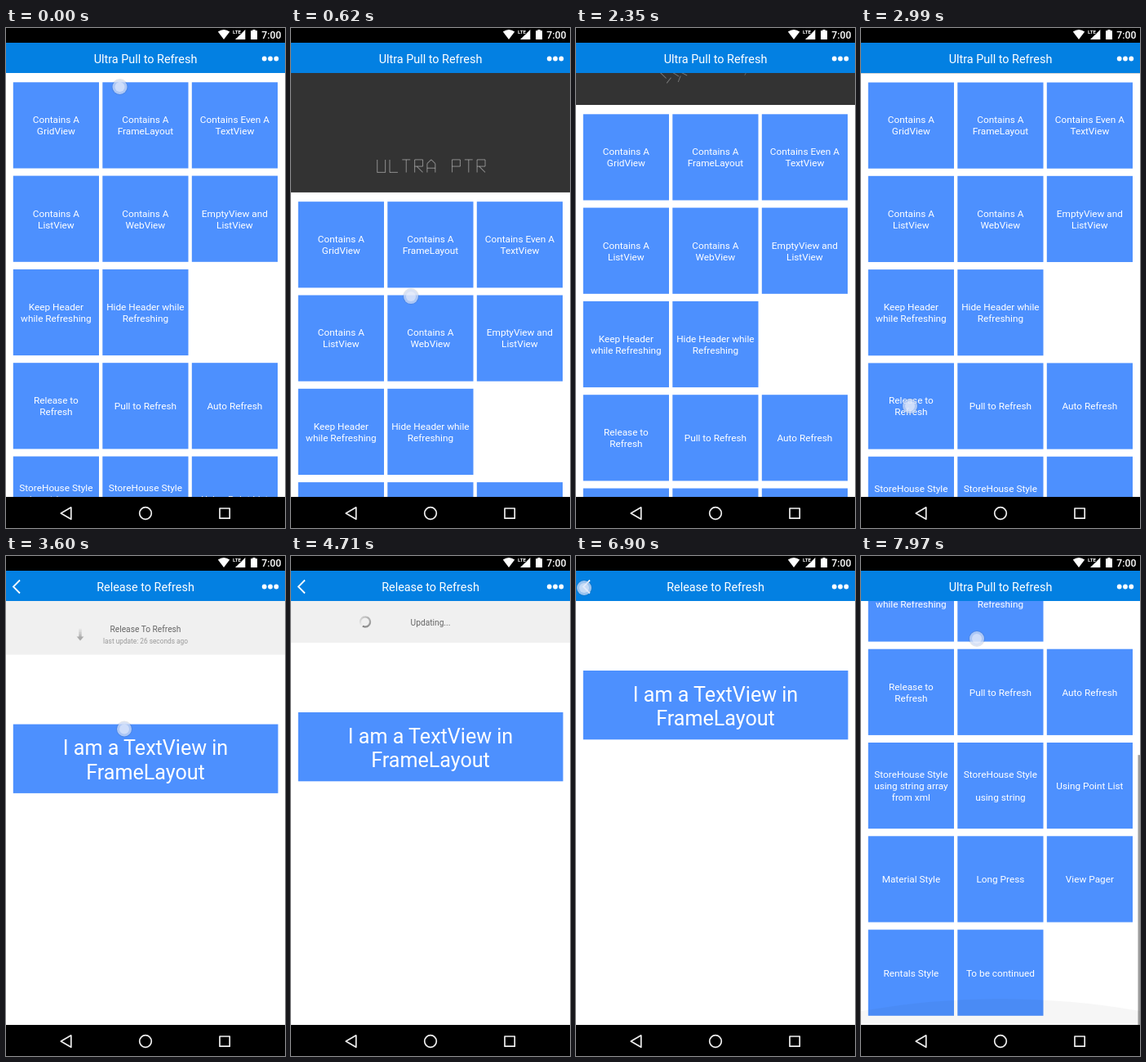
Write an HTML page that moves like this. It is 342 px wide and 611 px high and loops after 8 s.

```html
<!DOCTYPE html>
<html lang="en">
<head>
<meta charset="utf-8">
<title>Ultra Pull to Refresh</title>
<style>
html, body { margin: 0; width: 100%; height: 100%; overflow: hidden; background: #fff; }
svg { display: block; width: 342px; height: 611px; font-family: Roboto, "Noto Sans", sans-serif; }
</style>
</head>
<body>
<svg id="stage" viewBox="0 0 342 611">
  <defs>
    <clipPath id="bodyClip"><rect y="55" width="342" height="518"/></clipPath>
    <clipPath id="appClip"><rect y="18" width="342" height="555"/></clipPath>
  </defs>
</svg>
<script>
const LOOP = 8000, STEP = 156.5;
const BLUE = '#0380e2', CARD = '#4d90fe';
const TOP = 55, LOGO_H = 64, CLASSIC_H = 51, MAX_SCROLL = 295.5;
const stage = document.getElementById('stage');

function el(name, attrs, parent = stage, text) {
  const node = document.createElementNS('http://www.w3.org/2000/svg', name);
  set(node, attrs);
  if (text !== undefined) node.textContent = text;
  return parent.appendChild(node);
}
function set(node, attrs) {
  for (const key in attrs) node.setAttribute(key, attrs[key]);
}
function show(node, on) { node.setAttribute('visibility', on ? 'inherit' : 'hidden'); }
function label(parent, x, y, size, fill, text) {
  return el('text', { x, y, 'font-size': size, fill, 'text-anchor': 'middle' }, parent, text);
}

const clamp = (v, a = 0, b = 1) => Math.min(b, Math.max(a, v));
const mix = (a, b, p) => a + (b - a) * p;
const part = (t, start, length) => clamp((t - start) / length);
const inOut = p => p < 0.5 ? 2 * p * p : 1 - 2 * (1 - p) * (1 - p);
const sineOut = p => Math.sin(p * Math.PI / 2);
const within = (t, a, b) => t >= a && t < b;

// Scroller curve with a soft start and a long tail
function viscous(p) {
  const curve = x => x < 1 ? x - 1 + Math.exp(-x) : 1 - (1 - Math.exp(-1)) * Math.exp(1 - x);
  return curve(p * 8) / curve(8);
}

function makeRandom(seed) {
  return () => (seed = (seed * 16807) % 2147483647) / 2147483647;
}

function titleBar(parent, title) {
  el('rect', { y: 18, width: 342, height: 37, fill: BLUE }, parent);
  label(parent, 171, 42.5, 14.4, '#fff', title);
  for (const cx of [316.7, 324, 331.3]) el('circle', { cx, cy: 37.5, r: 2.9, fill: '#fff' }, parent);
}

// Home page
const home = el('g', { 'clip-path': 'url(#bodyClip)' });
el('rect', { y: TOP, width: 342, height: 518, fill: '#fff' }, home);
const dark = el('rect', { y: TOP, width: 342, fill: '#333' }, home);

const GLYPHS = {
  U: [[0, 0, 0, 72, 46, 72, 46, 0]],
  L: [[0, 0, 0, 72, 46, 72]],
  T: [[0, 0, 46, 0], [23, 0, 23, 72]],
  R: [[0, 72, 0, 0, 46, 0, 46, 38, 0, 38], [12, 38, 46, 72]],
  A: [[0, 72, 0, 22, 23, 0, 46, 22, 46, 72], [0, 48, 46, 48]],
  P: [[0, 72, 0, 0, 46, 0, 46, 38, 0, 38]]
};
const logo = el('g', { stroke: '#fff', 'stroke-width': 1.1 }, home);
const bars = [];
const random = makeRandom(77);
[...'ULTRA PTR'].forEach((ch, n) => {
  const scale = 0.2155;
  for (const line of GLYPHS[ch] || []) {
    for (let j = 0; j + 3 < line.length; j += 2) {
      const [x1, y1, x2, y2] = line.slice(j, j + 4).map(v => v * scale);
      const dx = (x2 - x1) / 2, dy = (y2 - y1) / 2;
      bars.push({
        x: 105.7 + n * 71 * scale + x1 + dx,
        y: y1 + dy,
        drift: random() * 171,
        node: el('line', { x1: -dx, y1: -dy, x2: dx, y2: dy }, logo)
      });
    }
  }
});

const LABELS = [
  'Contains A|GridView', 'Contains A|FrameLayout', 'Contains Even A|TextView',
  'Contains A|ListView', 'Contains A|WebView', 'EmptyView and|ListView',
  'Keep Header|while Refreshing', 'Hide Header while|Refreshing', '',
  'Release to|Refresh', 'Pull to Refresh', 'Auto Refresh',
  'StoreHouse Style|using string array|from xml', 'StoreHouse Style||using string', 'Using Point List',
  'Material Style', 'Long Press', 'View Pager',
  'Rentals Style', 'To be continued'
];
const grid = el('g', {}, home);
LABELS.forEach((text, i) => {
  if (!text) return;
  const x = 8.8 + (i % 3) * 109.5, y = 66.3 + Math.floor(i / 3) * 114.3;
  el('rect', { x, y, width: 105.2, height: 105.2, fill: CARD }, grid);
  const lines = text.split('|');
  lines.forEach((line, n) => {
    label(grid, x + 52.6, y + 56.9 + (n - (lines.length - 1) / 2) * 14, 11.8, '#fff', line);
  });
});
const glow = el('path', { d: 'M0 556Q171 526 342 556V573H0Z', fill: '#000' }, home);
const thumb = el('rect', { x: 339.5, width: 2.5, height: 330, fill: '#000', opacity: 0.38 }, home);
titleBar(stage, 'Ultra Pull to Refresh');

// Detail page
const detail = el('g', {}, el('g', { 'clip-path': 'url(#appClip)' }));
el('rect', { y: 18, width: 342, height: 555, fill: '#fff' }, detail);
const detailBody = el('g', { 'clip-path': 'url(#bodyClip)' }, detail);
const pale = el('rect', { y: TOP, width: 342, fill: '#f0f0f0' }, detailBody);
const header = el('g', {}, detailBody);
const headline = label(header, 171, 0, 10.2, '#666', '');
const updated = label(header, 171, 11.5, 8.3, '#999', 'last update: 26 seconds ago');
const arrow = el('g', { fill: '#aaa' }, header);
el('path', { d: 'M-4.3 2.5H4.3L0 7.5Z' }, arrow);
for (let i = 0; i < 5; i++) {
  el('rect', { x: -1.7, y: 1 - i * 2, width: 3.4, height: 1.6, opacity: 1 - i * 0.19 }, arrow);
}
const spinner = el('g', { fill: 'none', stroke: '#777', 'stroke-width': 2.2 }, header);
for (let i = 0; i < 24; i++) {
  const at = a => (6 * Math.cos(a)).toFixed(2) + ' ' + (6 * Math.sin(a)).toFixed(2);
  const a = i * Math.PI / 12;
  el('path', { d: `M${at(a)}A6 6 0 0 1 ${at(a + 0.28)}`, opacity: i / 24 }, spinner);
}
const box = el('g', {}, detailBody);
el('rect', { x: 8.8, y: 140, width: 324.7, height: 84.3, fill: CARD }, box);
label(box, 171, 177.5, 25.1, '#fff', 'I am a TextView in');
label(box, 171, 207, 25.1, '#fff', 'FrameLayout');
titleBar(detail, 'Release to Refresh');
el('path', { d: 'M17 29.5L9 37.5L17 45.5', fill: 'none', stroke: '#fff', 'stroke-width': 1.8 }, detail);

// System bars
el('rect', { width: 342, height: 18, fill: '#000' });
el('path', { d: 'M259.8 4.6Q267 -0.8 274.2 4.6L267 14Z', fill: '#fff' });
el('path', { d: 'M281 14L293.3 2V14Z', fill: '#fff' });
el('text', { x: 278, y: 7.3, 'font-size': 6.2, 'font-weight': 700, fill: '#fff', stroke: '#000', 'stroke-width': 1, 'paint-order': 'stroke' }, stage, 'LTE');
el('path', { d: 'M300 3.2H302.3V2H305.7V3.2H308V14H300Z', fill: '#fff' });
el('text', { x: 313.3, y: 13, 'font-size': 12.2, 'font-weight': 500, fill: '#fff' }, stage, '7:00');
el('rect', { y: 573, width: 342, height: 38, fill: '#000' });
const nav = el('g', { fill: 'none', stroke: '#eee', 'stroke-width': 1.7, 'stroke-linejoin': 'round' });
el('path', { d: 'M67.3 593L79.8 585.8V600.2Z' }, nav);
el('circle', { cx: 171, cy: 593, r: 7.3 }, nav);
el('rect', { x: 262, y: 587, width: 12.2, height: 12.2 }, nav);

// Touch dot
const finger = el('g', {});
el('circle', { r: 10, fill: '#345', opacity: 0.13 }, finger);
el('circle', { r: 9, fill: '#d3e0fb', opacity: 0.72 }, finger);
el('circle', { r: 6, fill: '#f0f4fd', opacity: 0.5 }, finger);

const dragOffset = (y, start) => Math.max(0, (y - start - 8) / 1.7);

const firstDrag = t => mix(72, 331.3, inOut(part(t, 0, 680)));
const secondDrag = t => mix(92, 379, sineOut(part(t, 3430, 620)));
const listDrag = t => mix(435, 101, inOut(part(t, 7640, 340)));

function homeOffset(t) {
  if (t < 760) return dragOffset(firstDrag(t), 72);
  if (t < 2218) return mix(dragOffset(firstDrag(760), 72), LOGO_H, viscous(part(t, 760, 500)));
  return LOGO_H * (1 - viscous(part(t, 2218, 1000)));
}

function detailOffset(t) {
  if (t < 4090) return dragOffset(secondDrag(t), 92);
  if (t < 5600) return mix(164, CLASSIC_H, viscous(part(t, 4090, 300)));
  return CLASSIC_H * (1 - viscous(part(t, 5600, 1000)));
}

function fingerAt(t) {
  if (t < 760) return [mix(139.5, 147, part(t, 0, 620)), firstDrag(t)];
  if (within(t, 2900, 3050)) return [60, 462];
  if (within(t, 3430, 4090)) return [145, secondDrag(t)];
  if (within(t, 6860, 6960)) return [10, 39];
  if (t >= 7640) return [142, listDrag(t)];
  return null;
}

function drawLogo(t, offset) {
  const loading = within(t, 760, 2218);
  const progress = Math.min(1, offset / LOGO_H);
  const top = TOP + offset - LOGO_H + 24;
  bars.forEach((bar, i) => {
    let real = 1, alpha = 0.4;
    if (loading) {
      const age = t - 760 - i * 1000 / bars.length;
      if (age >= 0) alpha += 0.6 * (1 - Math.min(1, age % 1000 / 400));
    } else {
      real = clamp((progress - 0.3 * i / bars.length) / 0.7);
      alpha *= real;
    }
    const x = bar.x + bar.drift * (1 - real), y = top + bar.y - 38 * (1 - real);
    set(bar.node, { transform: `translate(${x} ${y}) scale(${real}) rotate(${360 * real})`, opacity: alpha });
  });
}

function drawHome(t) {
  const offset = homeOffset(t);
  const pull = t >= 7640 ? Math.max(0, 427 - listDrag(t)) : 0;
  const scroll = Math.min(MAX_SCROLL, pull);
  dark.setAttribute('height', offset);
  drawLogo(t, offset);
  grid.setAttribute('transform', `translate(0 ${offset - scroll})`);
  show(thumb, scroll > 0);
  thumb.setAttribute('y', TOP + scroll * 518 / (518 + MAX_SCROLL));
  glow.setAttribute('opacity', 0.035 * clamp((pull - MAX_SCROLL) / 30));
}

function drawDetail(t) {
  const visible = part(t, 3060, 200) * (1 - part(t, 6960, 200));
  show(detail, visible > 0);
  if (!visible) return;
  set(detail, { opacity: visible, transform: `translate(0 ${30 * (1 - visible) ** 2})` });

  const offset = detailOffset(t);
  const pulling = t < 4090, busy = within(t, 4090, 5600);
  const ready = offset > CLASSIC_H * 1.2;
  pale.setAttribute('height', offset);
  box.setAttribute('transform', `translate(0 ${offset})`);
  header.setAttribute('transform', `translate(0 ${TOP + offset - CLASSIC_H / 2})`);
  headline.textContent = busy ? 'Updating...' : !pulling ? 'Updated.' :
    ready ? 'Release To Refresh' : 'Pull Down To Refresh';
  headline.setAttribute('y', pulling ? -2 : 4);
  show(updated, pulling);
  show(arrow, pulling);
  arrow.setAttribute('transform', `translate(91 1) rotate(${-180 * part(t, 3602, 150)})`);
  show(spinner, busy);
  spinner.setAttribute('transform', `translate(91 0) rotate(${120 + (t - 4695) * 0.36})`);
}

function draw(time) {
  const t = Math.floor((time % LOOP + 8) / 156.3) * STEP;
  drawHome(t);
  drawDetail(t);
  const spot = fingerAt(t);
  show(finger, spot);
  if (spot) finger.setAttribute('transform', `translate(${spot[0]} ${spot[1]})`);
}

const begin = performance.now();
function tick() {
  draw(performance.now() - begin);
  requestAnimationFrame(tick);
}
tick();
</script>
</body>
</html>
```
